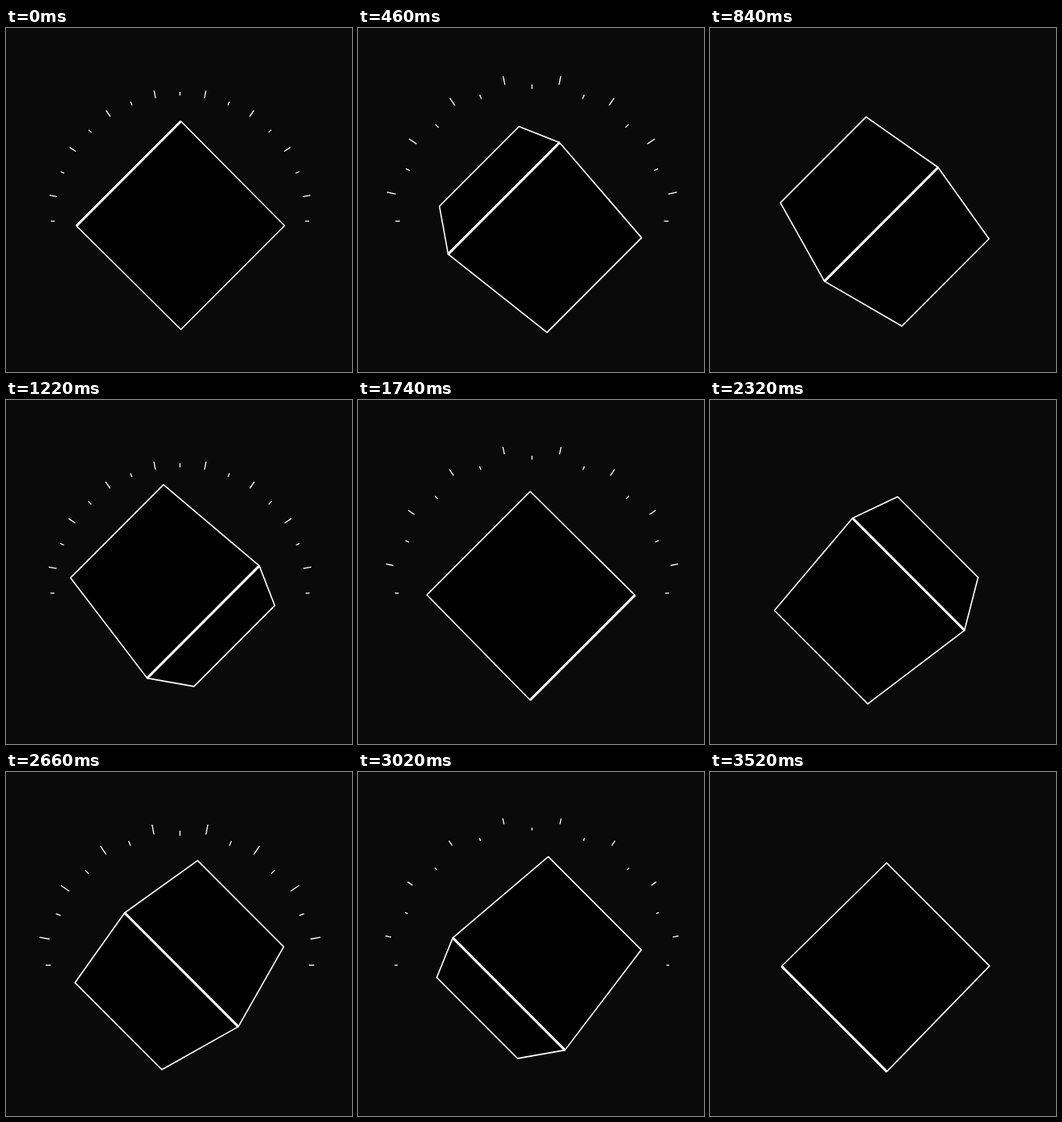
Recreate the animation shown at these times as an HTML page with a canvas. Size 428 px wide and 425 px high, loop 3.54 s.

```html
<!DOCTYPE html>
<html lang="en">
<head>
<meta charset="utf-8">
<title>Rolling cube</title>
<style>
  html, body { margin: 0; width: 100%; height: 100%; overflow: hidden; background: #0a0a0a; }
  canvas { display: block; }
</style>
</head>
<body>
<canvas id="stage" width="428" height="425"></canvas>
<script>
const ctx = document.getElementById('stage').getContext('2d');
const LOOP = 3540, STEP = 20;
const ROLL_STEPS = 90, BURST_STEPS = 60;
const HALF = 75.6, CAMERA = 446;
const VANISH = { x: 214, y: 212.5 };
const CUBE = { x: 1, y: 25.5 };
const BURST = { x: 215.2, y: 238.6, radius: 155 };

const clamp = v => Math.max(0, Math.min(1, v));

function project(x, y, z) {
  const scale = CAMERA / (CAMERA - z);
  return [VANISH.x + (CUBE.x + x) * scale, VANISH.y + (CUBE.y + y) * scale];
}

function line(a, b, width) {
  ctx.lineWidth = width;
  ctx.beginPath();
  ctx.moveTo(...a);
  ctx.lineTo(...b);
  ctx.stroke();
}

function face([a, b], [c, d]) {
  ctx.lineWidth = 1.6;
  ctx.beginPath();
  for (const p of [a, b, d, c]) ctx.lineTo(...p);
  ctx.closePath();
  ctx.fill();
  ctx.stroke();
}

// The cube turns about a diagonal axis; side is 1 or -1 for its travel in x.
function drawCube(degrees, side) {
  const angle = degrees * Math.PI / 180;
  const sin = Math.sin(angle), cos = Math.cos(angle);

  // Projects the edge that starts at (u, z) in the plane of rotation.
  const edge = (u, z) => {
    const along = HALF * (u * cos + z * sin) * Math.SQRT1_2;
    const depth = HALF * (z * cos - u * sin);
    const across = HALF * Math.SQRT1_2;
    return [-1, 1].map(v => project(side * (along + v * across), along - v * across, depth));
  };

  const shared = edge(-1, 1), leaving = edge(1, 1), arriving = edge(-1, -1);
  const limit = HALF / CAMERA;
  if (sin > limit) face(arriving, shared);
  if (cos > limit) face(shared, leaving);
  line(...shared, 3);
}

function drawBurst(step) {
  const inner = clamp((step - 1) / 41);
  const outer = step < 35 ? 1 - ((35 - step) / 41) ** 2 : 1;
  if (inner >= outer) return;
  for (let i = 0; i <= 16; i++) {
    const angle = Math.PI * (1 + i / 16);
    const reach = i % 2 ? 30 : 15;
    const at = part => {
      const r = BURST.radius + reach * part;
      return [BURST.x + r * Math.cos(angle), BURST.y + r * Math.sin(angle)];
    };
    line(at(inner), at(outer), 1.3);
  }
}

function draw(time) {
  const step = Math.floor((time % LOOP) / STEP);
  ctx.fillStyle = '#0a0a0a';
  ctx.fillRect(0, 0, 428, 425);
  ctx.fillStyle = '#000';
  ctx.strokeStyle = '#fff';
  ctx.lineJoin = 'round';
  drawBurst((step + 1) % BURST_STEPS);
  drawCube(step % ROLL_STEPS + 1, step < ROLL_STEPS ? 1 : -1);
}

const start = performance.now();
function tick() {
  draw(performance.now() - start);
  requestAnimationFrame(tick);
}
tick();
</script>
</body>
</html>
```
